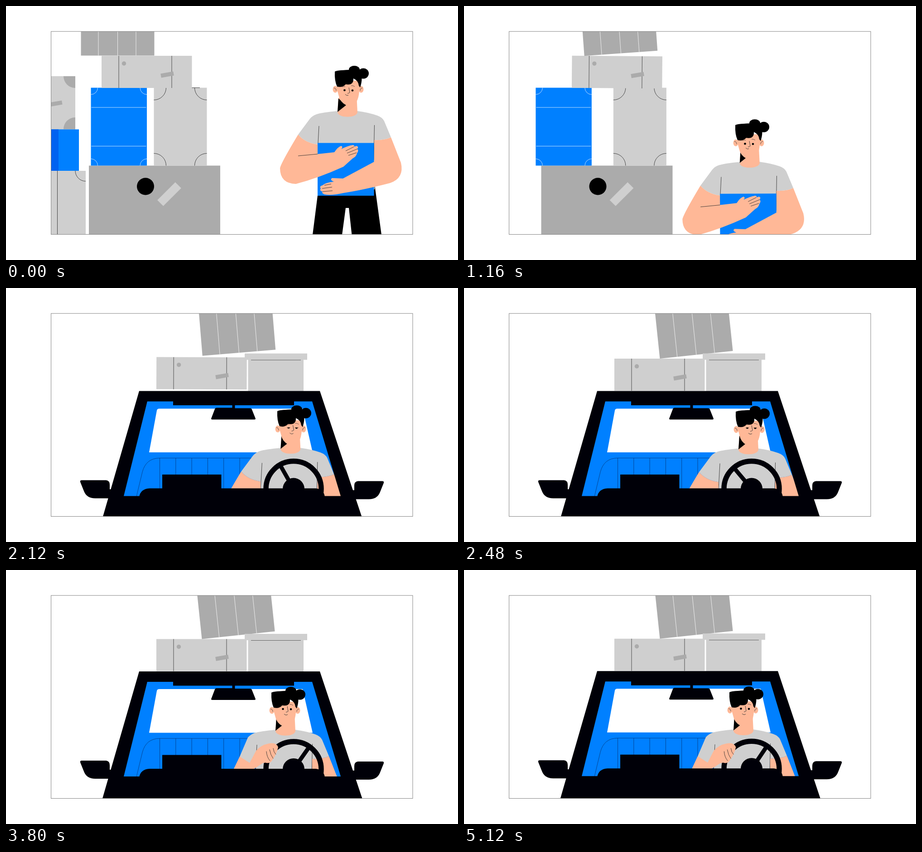
Recreate the animation shown at these times as an HTML page with a canvas. Size 998 px wide and 561 px high, loop 5.16 s.

```html
<!DOCTYPE html>
<html lang="en">
<head>
<meta charset="utf-8">
<title>Moving day</title>
<style>
html, body { margin: 0; width: 100%; height: 100%; overflow: hidden; background: #fff; }
canvas { display: block; }
</style>
</head>
<body>
<canvas id="stage" width="998" height="561"></canvas>
<script>
const g = document.getElementById('stage').getContext('2d');
const LOOP = 5160, DEG = Math.PI / 180;
const LIGHT = '#cfcfcf', DARK = '#ababab', BLUE = '#0080ff', SKIN = '#ffb897',
      INK = '#000', CAR = '#000008', LINE = '#333';

// Eased value at time t from pairs of (time, value)
function key(t, ...k) {
  if (t <= k[0]) return k[1];
  for (let i = 2; i < k.length; i += 2) {
    if (t < k[i]) {
      const p = (t - k[i - 2]) / (k[i] - k[i - 2]);
      return k[i - 1] + (k[i + 1] - k[i - 1]) * p * p * (3 - 2 * p);
    }
  }
  return k[k.length - 1];
}

function fill(d, color, rule) {
  g.fillStyle = color;
  g.fill(new Path2D(d), rule || 'nonzero');
}
function line(d, color = LINE, width = 0.9) {
  g.strokeStyle = color;
  g.lineWidth = width;
  g.stroke(new Path2D(d));
}
function rect(x, y, w, h, color) {
  g.fillStyle = color;
  g.fillRect(x, y, w, h);
}
function oval(x, y, rx, ry, color) {
  g.fillStyle = color;
  g.beginPath();
  g.ellipse(x, y, rx, ry, 0, 0, 7);
  g.fill();
}
function at(x, y, angle, draw) {
  g.save();
  g.translate(x, y);
  g.rotate(angle * DEG);
  draw();
  g.restore();
}
function tape(x, y, w, h, angle, color) {
  at(x, y, angle, () => rect(-w / 2, -h / 2, w, h, color));
}
// Quarter circles in the four corners of a box
function corners(w, h, r, color) {
  line(`M0,${r}A${r},${r} 0 0 0 ${r},0M${w - r},0A${r},${r} 0 0 0 ${w},${r}` +
    `M${w},${h - r}A${r},${r} 0 0 0 ${w - r},${h}M${r},${h}A${r},${r} 0 0 0 0,${h - r}`, color);
}

function leftStack(x) {
  at(x, 0, 0, () => {
    rect(0, 155, 153, 118, LIGHT);
    fill('M127,155H153V181A26,26 0 0 1 127,155ZM127,272A26,26 0 0 1 153,246V272Z', DARK);
    tape(110, 215.5, 28, 9, -10, DARK);
    rect(0, 272.5, 161, 91.5, BLUE);
    rect(0, 272.5, 116, 91.5, '#0062f0');
    rect(0, 364, 176, 145, LIGHT);
    line('M113.5,364V505M153,364A23,23 0 0 0 176,387');
  });
}

function boxes(t, bob) {
  const drop = key(t, 1690, 0, 2150, 340);
  const sway = (a, b, c) => key(t, 0, a, 640, b, 760, b, 1680, c);
  if (t < 700) leftStack(key(t, 0, 0, 540, -80));

  at(sway(183, 170.5, 170.5), 352.5 + drop, 0, () => {
    rect(0, 0, 290, 160, DARK);
    oval(125, 46, 19, 19, INK);
    tape(177.5, 63, 56, 18.5, -45, LIGHT);
  });
  at(sway(187.5, 136.5, 190.5), 180.5 + drop, 0, () => {
    rect(0, 0, 123.5, 172, BLUE);
    line('M1,43.5H122M1,129H122', '#cfe6ff');
    corners(123.5, 172, 15, '#cfe6ff');
  });
  at(sway(326.5, 296.5, 379), 180.5 + drop, 0, () => {
    rect(0, 0, 117, 172, LIGHT);
    corners(117, 172, 27, LINE);
    line('M-9,0H101.5');
  });

  const wx = key(t, 0, 211, 640, 174, 760, 174, 1680, 332);
  const wy = key(t, 0, 181, 1100, 181, 1680, 171, 2200, 222.5) + bob;
  at(wx, wy, key(t, 1000, 0, 1680, 3.3, 2200, 0), () => {
    rect(0, -71, 199.5, 71, LIGHT);
    line('M38,-71V0M155,-71V0', '#555', 1.1);
    oval(49.5, -54, 4.7, 4.7, DARK);
    tape(145, -29.5, 28.5, 9, -10, DARK);
  });

  const dx = key(t, 0, 165.5, 640, 146, 760, 146, 1680, 442, 2250, 432.5);
  const dy = key(t, 0, 109.5, 640, 114, 760, 114, 1680, 105, 2250, 151.5) + bob;
  at(dx, dy, key(t, 0, 0, 640, -9.6, 760, -9.6, 1680, 3.9, 2250, -6), () => {
    rect(0, -130, 162, 130, DARK);
    line('M38.5,-130V0M81,-130V0M121.5,-130V0', '#eee', 1);
  });
}

function carBack() {
  rect(534.5, 150, 122.5, 75, LIGHT);
  rect(527, 140, 138, 14, LIGHT);
  line('M541,154.5H651', '#555');
  fill('M312,245H677L740,457H259Z', BLUE);
  fill('M338,262H655L677,358.5H316L333,266Q334,262 338,262Z', '#fff');
  let seams = '';
  for (let i = 0; i < 7; i++) seams += `M${339.5 + i * 35.3},371V456`;
  line('M288,456L301,402Q309,371 340,371H600' + seams, '#06377a', 0.8);
}

function sideMirror() {
  fill('M167,420H221Q229,421 229,430V440H236V458H229V460H197Q178,460 172,444L164,424Q163,420 167,420Z', CAR);
}

function carFront() {
  fill('M294,223H693L820,604H184ZM312,246L260,455H739L676,246Z', CAR, 'evenodd');
  fill('M369,224H636V254.5H369ZM499.500,254H505.500V261H539Q542,261 543,264L551,284Q551,286 549,286H455' +
    'Q453,286 453,284L461,263Q462,260 465,260H499.500Z', CAR);
  fill('M294,457Q297,439 317,438H345V407.500H475.500V438H684Q702,440 704,457Z', CAR);
  sideMirror();
  g.save();
  g.translate(998, 2);
  g.scale(-1, 1);
  sideMirror();
  g.restore();
}

function wheel(angle) {
  g.beginPath();
  g.arc(635, 439, 61, 0, 7);
  g.strokeStyle = CAR;
  g.lineWidth = 11.5;
  g.stroke();
  oval(635, 439, 24, 24, CAR);
  at(635, 439, angle, () => rect(-4.5, -60, 9, 60, CAR));
}

function steeringArm(angle) {
  const a = (angle + 3) * DEG, x = 635 - 61 * Math.cos(a), y = 438 - 61 * Math.sin(a);
  const elbow = 502 + Math.max(0, Math.min(9, (35 - angle) * 0.5));
  at(x, y, 0, () => {
    const ox = -x, oy = -y;
    fill(`M${516 + ox},${411 + oy}L${elbow + ox},${440 + oy}V${475 + oy}H${545 + ox}V${440 + oy}` +
      'L-20,25L-14,24Q-5,27 0,20Q11,5 14,-10Q10,-22 -8,-18Q-24,-15 -35,-2' +
      `L${538 + ox},${425 + oy}Z`, SKIN);
    line('M-12,-1Q-11,12 -4,20M-5,-5Q-3,7 3,15M3,-8Q4,1 9,6');
  });
}

function pants(spread) {
  fill(`M691,395H814L${829 + spread},505L${845 + spread},610H775L757,446H750L728,610H661L677,505Z`, INK);
}

function shirt(drive) {
  const sx = 645 + 8 * drive, sy = 284 + 7 * drive, ux = 688 - 12 * drive;
  fill(`M732,232Q698,235 686,239Q677,242 671,249L${sx},${sy}Q660,302 ${ux},306L688,310L690,405H814` +
    'L813,296Q835,297 850,290L835,254Q831,246 820,242Q800,235 776,232Z', LIGHT);
  line('M691,265L687,340M813.500,263L812,340');
}

function neck() {
  fill('M734,203L732,235C734,248 774,248 776,235L774,195Z', SKIN);
  fill('M734,204L751,219L732,234Z', INK);
}

function face(lid, fx, fy, smile) {
  oval(727, 184, 5.5, 7.5, SKIN);
  oval(784, 184, 5.5, 7.5, SKIN);
  fill('M731,165H783L780,188Q779,203 774,211Q764,222 751,219Q737,212 734,196L731,185Z', SKIN);
  line('M724,181Q729,181 729,187M787,181Q782,181 782,187', LINE, 0.8);
  fill('M726,145Q728,142 758,141L782,147Q789,158 782,180L779,176Q778,165 767,160Q768,176 750,173Q743,181 731,178Q725,165 726,145Z', INK);
  oval(769, 140.5, 12, 8.500, INK);
  oval(789, 149, 12, 11.500, INK);
  at(fx, fy, 0, () => {
    oval(747.5, 186, 2.3, 2.3 * lid, INK);
    oval(765, 186.500, 2.3, 2.3 * lid, INK);
    if (lid < 0.8) line('M744,185.500H751M761.500,185.500H769', INK, 0.8);
    line('M742,179Q745,177 749,178M762,176Q766,175 770,178', LINE, 0.7);
    line('M757,180L759,191Q757,193 754,193');
    line(smile ? 'M750,197Q754,201 758,198' : 'M749,195Q752,199 756,197');
  });
}

function heldBox(y, angle) {
  at(688, 302.5 + y, angle, () => rect(0, 0, 124.5, 116.5, BLUE));
}

// Both arms around the box; the hands are shifted by x, y
function rightArm(x, y) {
  const p = (a, b) => `${a + x},${b + y}`;
  fill('M813,296Q835,297 850,290L872,346Q880,380 848,391' +
    `Q790,406 ${p(745, 413)}Q${p(718, 419)} ${p(703, 416)}Q${p(696, 413)} ${p(699, 410)}` +
    `Q${p(691, 408)} ${p(695, 403)}Q${p(691, 398)} ${p(699, 396)}Q${p(705, 390)} ${p(724, 388)}` +
    `Q${p(714, 384)} ${p(720, 380)}L${p(744, 381)}L813,344Z`, SKIN);
  line(`M${p(698, 403)}L${p(720, 400)}M${p(699, 410)}L${p(721, 408)}M${p(703, 396)}L${p(718, 393)}`);
}
function leftArm(x, y) {
  const p = (a, b) => `${a + x},${b + y}`;
  fill(`M645,284Q660,302 688,306V327L${p(725, 323)}Q${p(733, 311)} ${p(740, 309)}Q${p(745, 311)} ${p(740, 316)}` +
    `Q${p(754, 309)} ${p(766, 307)}Q${p(771, 308)} ${p(768, 311)}L${p(774, 309)}Q${p(780, 311)} ${p(775, 316)}` +
    `Q${p(780, 318)} ${p(775, 325)}Q${p(774, 332)} ${p(765, 337)}L${p(745, 355)}` +
    'Q690,380 640,393Q605,392 605,358Q607,347 645,284Z', SKIN);
  line(`M${p(750, 320)}L${p(768, 311)}M${p(753, 325)}L${p(775, 316)}M${p(756, 330)}L${p(774, 324)}`);
  line(`M645,331L688,${327 + y * 0.15}`);
}

function person(t, steering) {
  const dx = key(t, 0, 0, 560, -65, 740, -65, 1220, -125, 2600, -126, 3400, -137);
  const dy = key(t, 0, 0, 560, 51, 740, 51, 1220, 115, 1680, 116, 2480, 118, 3400, 120);
  const lean = key(t, 0, 0, 560, -5, 740, -5, 1220, 0);
  const handY = key(t, 0, 0, 560, -15, 740, -15, 1200, 0, 1680, 36, 2100, 60);
  const handX = key(t, 1200, 0, 1680, 6);
  const drive = key(t, 2600, 0, 3400, 1);

  at(dx, dy, 0, () => pants(key(t, 0, 0, 560, 22, 740, 22, 1200, 0)));
  at(752 + dx, 412 + dy, lean, () => {
    g.translate(-752, -412);
    shirt(drive);
    neck();
    if (t < 2250) heldBox(handY, key(t, 1200, 0, 1680, 1.5));
    rightArm(0, handY);
    if (!steering) leftArm(handX, handY);
  });

  const hx = key(t, 0, 0, 560, -81, 740, -81, 1220, -129, 1680, -129, 2400, -126, 2600, -126, 3400, -140);
  const hy = key(t, 0, 0, 560, 55, 740, 55, 1220, 121, 1680, 122, 2480, 124, 3400, 125);
  const lid = key(t, 1540, 1, 1640, 0.1, 1780, 0.1, 2200, 0.65, 2640, 0.65, 2800, 1);
  at(hx, hy, 0, () =>
    face(lid, key(t, 1200, 0, 2400, 4), key(t, 1200, 0, 2400, -5), t > 2100));
}

function draw(t) {
  g.fillStyle = '#fff';
  g.fillRect(0, 0, 998, 561);
  g.save();
  g.beginPath();
  g.rect(99.5, 56, 799, 448.5);
  g.clip();

  const bob = 4.5 * key(t, 1690, 0, 2200, 1) * Math.exp(-Math.max(0, t - 2480) / 880);
  const rise = 370 * Math.pow(1 - Math.max(0, Math.min(1, (t - 1690) / 480)), 3);
  const angle = key(t, 1700, -10, 2400, -40, 2600, -40, 3400, 38, 3800, 35, 4540, 18, 4600, 18, 5120, 34);
  const steering = t > 2600 && angle > -30;
  const inCar = t > 1690;

  boxes(t, bob);
  if (inCar) at(0, rise + bob, 0, carBack);
  at(0, bob, 0, () => person(t, steering));
  if (inCar) {
    at(0, rise + bob, 0, () => {
      wheel(angle);
      if (steering) steeringArm(angle);
      carFront();
    });
  }
  g.restore();
  g.strokeStyle = '#858585';
  g.lineWidth = 1;
  g.strokeRect(99.5, 56.2, 798.5, 448.3);
}

const start = performance.now();
function tick() {
  draw((performance.now() - start) % LOOP);
  requestAnimationFrame(tick);
}
tick();
</script>
</body>
</html>
```
